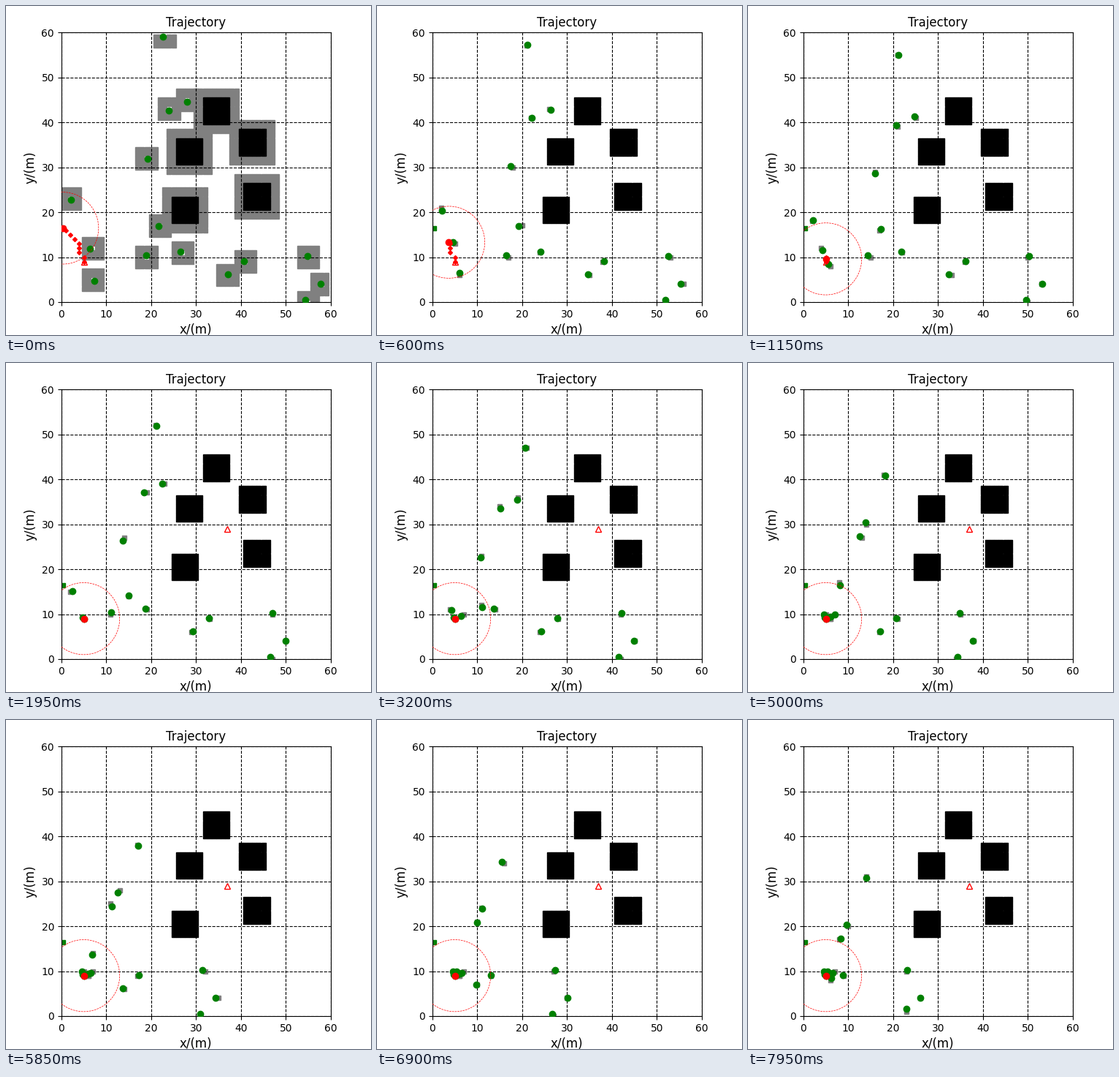
Write a matplotlib script that moves like this. It is 500 px wide and 450 px high and loops after 8 s.

```python
import numpy as np
import matplotlib.pyplot as plt
from matplotlib.animation import FuncAnimation

FRAMES, INTERVAL = 160, 50
STEP = 0.2            # chaser travel per frame
ROBOT_STEP = 0.386    # robot travel per frame
GAP = 0.45            # closest distance between chasers
SIZE = 60             # side of the map in cells
SIGHT = 8             # radius of the robot's view

BLOCKS = [(25, 18), (26, 31), (32, 40), (40, 33), (41, 21)]
ROUTE = np.array([(0.3, 16.45), (1, 16), (2, 15), (3, 14), (4, 13), (4, 12),
                  (4, 11), (5, 10), (5, 9)])
NEXT_GOAL = (37, 29)
STARTS = np.array([
    (7.35, 4.66), (6.4, 11.9), (2.1, 22.8), (18.9, 10.4), (21.7, 16.9),
    (26.5, 11.15), (19.2, 31.9), (37.05, 6.1), (40.7, 9.05), (23.9, 42.6),
    (28, 44.5), (22.7, 58.95), (54.3, 0.45), (54.9, 10.2), (57.8, 4.05)])

route_len = np.r_[0, np.cumsum(np.hypot(*np.diff(ROUTE, axis=0).T))]


def robot_at(n):
    s = n * ROBOT_STEP
    return np.array([np.interp(s, route_len, c) for c in ROUTE.T])


def chase():
    """Every chaser heads for the robot in the nearest of 8 directions."""
    track = [STARTS]
    for n in range(1, FRAMES):
        pos, target = track[-1].copy(), robot_at(n - 1)
        for i, p in enumerate(pos):
            dx, dy = target - p
            if np.hypot(dx, dy) < STEP:
                continue
            a = np.round(np.arctan2(dy, dx) / (np.pi / 4)) * np.pi / 4
            new = p + STEP * np.array([np.cos(a), np.sin(a)])
            others = np.delete(pos, i, axis=0)
            if np.hypot(*(others - new).T).min() > GAP:
                pos[i] = new
        track.append(pos)
    return np.array(track)


def patch(x, y, w, h):
    """Cells of a w by h rectangle, kept inside the map."""
    return [(i, j) for i in range(x, x + w) for j in range(y, y + h)
            if 0 <= i < SIZE and 0 <= j < SIZE]


track = chase()
# the map lags one step behind the chasers
seen = np.concatenate([[2 * track[0] - track[1]], track[:-1]])
seen = np.floor(seen + 0.5).astype(int)

fig = plt.figure(figsize=(5, 4.5), dpi=100)
ax = fig.add_axes([75.75 / 500, 45 / 450, 369 / 500, 369 / 450])
ax.set(xlim=(0, SIZE), ylim=(0, SIZE),
       xticks=range(0, SIZE + 1, 10), yticks=range(0, SIZE + 1, 10))
ax.set_title("Trajectory", fontsize=12)
ax.set_xlabel("x/(m)", fontsize=12)
ax.set_ylabel("y/(m)", fontsize=12)
ax.grid(color="k", linestyle="--", linewidth=0.8)


def marks(shape, color, size, z, **kw):
    return ax.plot([], [], shape, color=color, ms=size, mew=1,
                   linestyle="none", zorder=z, **kw)[0]


cells = marks("s", "gray", 4, 1)
walls = marks("s", "black", 4, 1.1)
home = marks("s", "green", 4, 2)
goal = marks("^", "red", 6, 2.1, mfc="none")
dots = marks("o", "green", 6, 3)
trail = marks("D", "red", 3, 4)
robot = marks("o", "red", 6, 4.1)
sight, = ax.plot([], [], "r--", lw=0.5, zorder=3.5)

walls.set_data(*zip(*[c for x, y in BLOCKS for c in patch(x, y, 6, 6)]))
home.set_data(*ROUTE[:1].T)
theta = np.linspace(0, 2 * np.pi, 200)


def draw(n):
    taken = [tuple(c) for c in seen[n]]
    if n == 0:
        # the planner widens every obstacle by two cells
        wide = [c for x, y in taken
                for c in patch(x - 2, y - 2, 5, 5) if c != (x, y)]
        taken = wide + [c for x, y in BLOCKS
                        for c in patch(x - 2, y - 2, 10, 10)]
    cells.set_data(*zip(*taken))
    dots.set_data(*track[n].T)

    s, (x, y) = n * ROBOT_STEP, robot_at(n)
    arrived = s >= route_len[-1]
    left = ROUTE[(route_len > s - 0.5) & (not arrived)]
    trail.set_data(*left.T)
    robot.set_data([x], [y])
    sight.set_data(x + SIGHT * np.cos(theta), y + SIGHT * np.sin(theta))
    gx, gy = NEXT_GOAL if arrived else ROUTE[-1]
    goal.set_data([gx], [gy])
    return cells, dots, trail, robot, sight, goal


anim = FuncAnimation(fig, draw, frames=FRAMES, interval=INTERVAL,
                     repeat=True, repeat_delay=0, blit=False)
plt.show()
```
